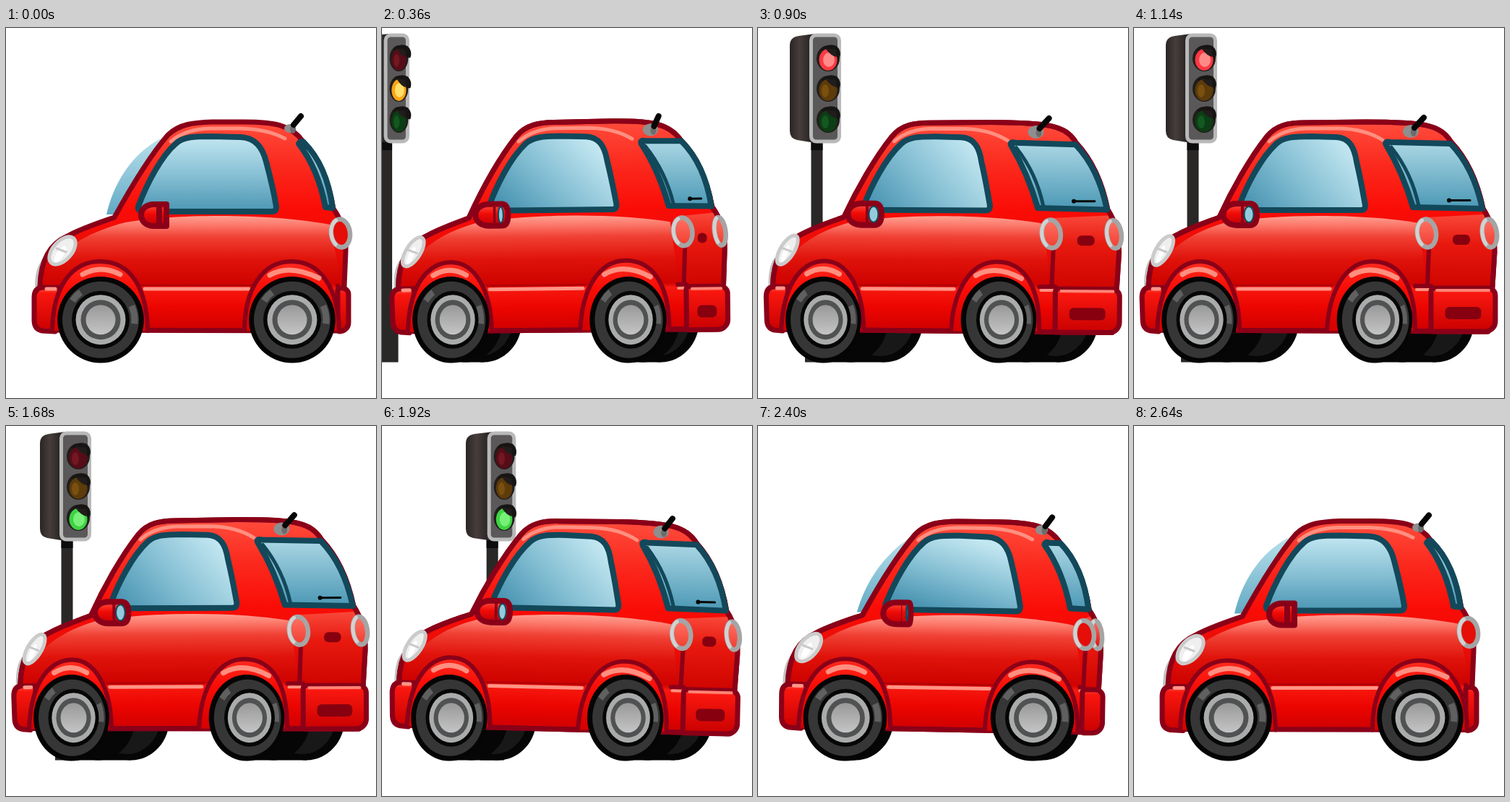
An HTML page with a canvas for the animation above (2700 ms loop, 512x512 px).

```html
<!DOCTYPE html>
<html lang="en">
<head>
<meta charset="utf-8">
<title>Car at a traffic light</title>
<style>
html, body { margin: 0; width: 100%; height: 100%; overflow: hidden; background: #fff; }
canvas { display: block; width: 512px; height: 512px; }
</style>
</head>
<body>
<canvas id="stage" width="512" height="512"></canvas>
<script>
const g = document.getElementById('stage').getContext('2d');
const LOOP = 2700, STEP = 60;
const DARK = '#8a0018', TEAL = '#12485a', SHINE = '#ff8f80';

// time, side turn, rear turn, pitch in degrees, drop
const POSES = [
  [0, 0, 0, 0, 0],
  [180, .5, .07, -.1, 0],
  [360, .88, .19, -.6, 0],
  [540, .99, .8, -2.4, 0],
  [660, 1, 1, -3.5, 0],
  [840, 1, 1, 1, 0],
  [960, 1, 1, -.4, 0],
  [1080, 1, 1, 0, 0],
  [1620, 1, 1, 0, 0],
  [1680, 1, .95, -.2, 0],
  [1920, .94, .66, 1.3, 0],
  [2160, .74, .25, 1.8, 0],
  [2460, .14, .04, .7, 1],
  [2640, 0, 0, 0, 1.5],
  [2700, 0, 0, 0, 0]
];

const lerp = (a, b, k) => a + (b - a) * k;

function poseAt(t) {
  let i = 1;
  while (POSES[i][0] < t) i++;
  const a = POSES[i - 1], b = POSES[i], k = (t - a[0]) / (b[0] - a[0]);
  return a.map((v, n) => lerp(v, b[n], k));
}

// blends the numbers of two paths of equal structure
function mix(a, b, k) {
  const to = b.match(/-?\d+/g);
  let i = 0;
  return a.replace(/-?\d+/g, v => lerp(+v, +to[i++], k).toFixed(2));
}

function ramp(x0, y0, x1, y1, ...stops) {
  const r = g.createLinearGradient(x0, y0, x1, y1);
  stops.forEach(([at, c]) => r.addColorStop(at, c));
  return r;
}

function paint(path, fill, stroke, width) {
  if (fill) { g.fillStyle = fill; g.fill(path); }
  if (stroke) { g.strokeStyle = stroke; g.lineWidth = width; g.stroke(path); }
}

const shape = (d, fill, stroke, width) => paint(new Path2D(d), fill, stroke, width);

function oval(x, y, rx, ry, fill, stroke, width, turn = 0) {
  const p = new Path2D();
  p.ellipse(x, y, Math.max(rx, .1), ry, turn, 0, 7);
  paint(p, fill, stroke, width);
}

function box(x, y, w, h, r, fill, stroke, width) {
  const p = new Path2D();
  p.roundRect(x, y, w, h, r);
  paint(p, fill, stroke, width);
}

function trafficLight(t, s) {
  let x = 79.5;
  if (t < 600) x -= .00131 * (600 - t) ** 2;
  if (t > 1618) x += .00078 * (t - 1618) ** 2;
  if (x < -60 || x > 580) return;
  const k = s ** 1.7, face = 44 * k, side = 27 + 27 * (1 - k);
  const left = x - (face + side) / 2, fx = left + side, mid = fx + face / 2;
  const on = t < 480 ? 1 : t < 1560 ? 0 : 2;

  g.fillStyle = '#2a2826';
  g.fillRect(x - 6, 155, 16, 260);
  g.fillRect(x - 14.5, 410, 33, 52.5);
  g.fillStyle = '#0c0c0c';
  g.fillRect(x - 6, 155, 16, 14);
  shape(`M${fx + 8} 8L${left + 12} 11Q${left} 13 ${left} 24V142Q${left} 153 ${left + 10} 155L${fx + 8} 159Z`,
    ramp(left, 0, fx, 0, [0, '#292524'], [.5, '#463d3b'], [1, '#2c2827']));
  box(fx + 2.5, 10, Math.max(face - 5, 1), 147, 7, '#5a5859', '#b9b9b9', 5);

  const off = ['#560d17', '#5d3b0a', '#0c3d14'];
  const lit = ['#fb3943', '#fca516', '#3ed342'];
  const glow = ['#ff8b88', '#ffe06a', '#78f078'];
  [42, 84, 127].forEach((y, i) => {
    const lx = mid + 4 * k;
    oval(lx, y, 16 * k, 18, '#211d1c');
    shape(`M${lx - 10 * k} ${y - 12}Q${lx} ${y - 22} ${lx + 12} ${y - 17}Q${lx + 19} ${y - 10} ${lx + 16} ${y - 1}Q${lx + 10} ${y + 1} ${lx + 8} ${y - 8}Z`, '#171514');
    oval(lx, y + 2, 12.5 * k, 15, i === on ? lit[i] : off[i]);
    if (i === on) oval(lx + k, y + 2, 8 * k, 10, glow[i]);
    else oval(lx - 4 * k, y + 3, 5 * k, 9, ['#741722', '#79500f', '#135820'][i]);
    shape(`M${lx - 4 * k} ${y - 14}L${lx + 11 * k} ${y - 12}L${lx + 12 * k} ${y - 2}Q${lx + 4 * k} ${y - 3} ${lx - 4 * k} ${y - 14}Z`, '#211d1c');
  });
}

function farWheel(x, w) {
  if (w < .02) return;
  const dx = 85 * w;
  g.fillStyle = '#060606';
  g.fillRect(x, 405, dx, 57.5);
  oval(x + dx, 404, 53, 58.5, '#060606');
  oval(x + dx - 6, 404, 46, 50, '#181818');
  oval(x + dx * .45, 404, 51, 58.5, '#060606');
}

function wheel(x, s, shift) {
  const y = 403.7, kx = lerp(1, .875, s), hx = x + shift * s;
  const ring = (cx, r, c) => oval(cx, y, r * kx, r, c);
  ring(x, 59.8, '#050505');
  ring(x + shift * s * .3, 53, '#363636');
  g.save();
  g.translate(x, y);
  g.scale(kx, 1);
  g.strokeStyle = '#606060';
  g.lineWidth = 9;
  [[-2.55, -2.2], [-.42, .12]].forEach(([a, b]) => {
    g.beginPath();
    g.arc(0, 0, 47, a, b);
    g.stroke();
  });
  g.restore();
  ring(hx, 40, '#060606');
  ring(hx, 34.5, '#aaabab');
  ring(hx, 27.5, '#505152');
  ring(hx, 20.5, ramp(0, y - 20, 0, y + 20, [0, '#999'], [1, '#c4c4c4']));
}

function carBody(s, q) {
  const w = (s + q) / 2, lag = s - q;
  const corner = lerp(s, q, .15);
  const side = (a, b) => mix(a, b, s), rear = (a, b) => mix(a, b, q);
  const edge = (a, b) => mix(a, b, corner);
  const x = (a, b, k = s) => lerp(a, b, k);

  // far windscreen and far headlight
  shape(side('M139 258C148 218 172 175 214 153L165 258Z', 'M120 258C132 225 160 185 190 152L150 258Z'),
    ramp(0, 155, 0, 258, [0, '#b7dfeb'], [1, '#62aac4']));
  shape(side('M40 358C40 335 46 321 58 314L60 358Z', 'M14 358C14 335 17 322 28 314L32 358Z'), '#c2c2c2');

  // shell
  const shell = side(
    'M60 418L47 357C48 320 62 298 85 288C105 277 130 269 150 262C172 222 198 178 224 148C240 133 258 131 285 130L330 130',
    'M32 418L20 357C21 322 34 298 58 287C80 275 100 269 118 262C135 225 160 180 184 150C197 134 215 131 235 131L320 130')
    + rear(
      'C370 130 395 134 411 157Q443 190 453 250C466 268 471 290 470 310L468 358L462 419Z',
      'C400 130 424 133 439 158Q471 192 483 250C495 268 499 290 499 310L496 358L490 420Z');
  shape(shell, ramp(0, 130, 0, 422, [0, '#ff4c3c'], [.2, '#fb2a1e'], [.42, '#fa0c06'], [.62, '#e80d08'],
    [.77, '#cf0300'], [.79, '#f7180f'], [.88, '#ec0500'], [1, '#cb0000']), DARK, 7);

  // shoulder light, fading down the doors
  shape(side(
    'M56 350C64 308 115 282 165 269C240 256 370 257 448 272L464 350Z',
    'M28 350C38 308 80 282 128 269C200 257 320 257 394 270L404 350Z'),
    ramp(0, 260, 0, 352, [0, '#ffa092'], [.15, '#fb7567'], [.32, '#f04034'], [.65, '#e0130b'], [1, '#cf0300']));

  // roof light
  g.lineCap = 'round';
  shape(side('M228 157Q248 140 282 139L325 139Q362 140 386 153', 'M187 157Q206 140 238 139L285 139Q320 140 344 155'), null, SHINE, 5);

  // sill crease
  shape(side('M188 356L340 356', 'M140 356L275 356'), null, '#b50008', 3);
  shape(side('M192 361L336 361', 'M144 361L271 361'), null, '#ff9486', 5);

  // side window
  shape(side(
    'M183 247C195 215 215 177 235 160C245 150 262 150 285 150L325 151C345 152 355 165 360 185C368 215 372 235 374 247Q374 254 368 254L190 254Q182 254 183 247Z',
    'M146 245C155 220 175 180 197 160C207 151 220 150 245 150L280 151C298 152 305 165 308 185C315 215 318 235 320 245Q320 252 314 252L152 252Q144 252 146 245Z'),
    ramp(x(278, 170), 254, x(278, 285), 150, [0, '#4c96b3'], [.45, '#82bdd2'], [1, '#c3e7f1']), TEAL, 8);

  // rear face
  if (w > .08) {
    const l = x(462, 406, corner), r = x(470, 498, q);
    shape(`M${l} 262L${r - 14} 258L${r} 300L${r - 2} 358L${l} 358Z`,
      ramp(0, 258, 0, 358, [0, '#f8483a'], [.4, '#e8190f'], [1, '#cf0500']));
    shape(`M${l + 2} 306L${l} 358`, null, DARK, 6);
    shape(shell, null, DARK, 7);
  }
  shape(edge('M405 160Q408 155 412 158', 'M349 162Q346 156 355 158')
    + rear('L412 158Q444 190 452 249', 'L438 160Q470 193 482 250')
    + edge('L442 248Q432 195 405 160Z', 'L386 248Q372 200 349 162Z'),
    ramp(0, 155, 0, 250, [0, '#aed9e6'], [1, '#4b98b5']), TEAL, 8);
  if (w > .2) {
    shape(edge('M405 165Q432 200 445 246', 'M356 165Q384 200 394 246'), null, TEAL, 5);
    const wx = x(452, 436) - 14 * lag;
    g.lineCap = 'round';
    shape(`M${wx} 238.5L${wx + 29 * w} 238.5`, null, '#080808', 3);
    oval(wx, 238.5, 3, 3, '#080808');
  }

  // bumpers
  const red = ramp(0, 357, 0, 422, [0, '#ff6a5b'], [.15, '#f9170f'], [1, '#c70000']);
  shape(side(
    'M68 420L50 419Q39 417 39 404L39 373Q39 360 50 359L76 359Z',
    'M34 420L23 419Q12 417 12 403L11 373Q11 360 21 359L42 359Z'), red, DARK, 7);
  shape(side('M56 361L68 361', 'M26 361L35 361'), null, '#ff9486', 5);
  const bl = x(459, 411, corner), br = x(474, 500, q);
  shape(`M${bl - 22 * w} 357L${bl} 357`, null, DARK, 6);
  shape(`M${bl - 20 * w} 362L${bl} 362`, null, SHINE, 4);
  box(bl, 360, br - bl, 60, [4, 10, 14, 3], red, DARK, 7);
  if (w > .2) {
    shape(`M${bl + 8} 363L${br - 9} 363`, null, '#ff8374', 4);
    const c = (bl + br) / 2;
    box(c - 25 * w, 386, 50 * w, 17, 6, '#87000f');
    box(x(458, 453) - 13 * lag - 12 * w, 286, 24 * w, 14, 6, '#87000f');
  }

  // arches
  const skin = ramp(0, 322, 0, 420, [0, '#ff2b1f'], [.4, '#f80c05'], [1, '#d50000']);
  shape(side(
    'M64 419C65 352 95 323 130 323C174 323 195 362 196 419',
    'M32 419C35 347 65 323 92 323C125 323 146 365 146 419'), skin, DARK, 6);
  shape(side(
    'M330 419C330 360 356 323 395 323C435 323 460 360 461 419',
    'M267 419C270 360 295 323 330 323C370 323 390 360 389 419'), skin, DARK, 6);
  g.lineCap = 'round';
  shape(side('M106 341Q131 327 158 341', 'M67 341Q89 327 112 341'), null, SHINE, 7);
  shape(side('M365 342Q392 326 433 346', 'M301 342Q328 326 364 346'), null, SHINE, 7);

  // headlight
  const hx = x(78, 40), tilt = x(-.84, -1.02);
  oval(hx, 308, 23, x(13, 9.5), '#efefef', '#cbcbcb', 5, tilt);
  oval(hx - 3, 313, 13, x(5, 3.5), '#fff', null, 0, tilt - .15);
  shape(`M${hx - 8} 305L${hx + 5} 310`, null, '#c9c9c9', 3);

  // tail lamps
  const lamp = (lx, rx, inner) => {
    oval(lx, 284, rx, 19.5, inner, '#a5a5a5', 6.5, -.13);
    g.strokeStyle = '#d2d2d2';
    g.lineWidth = 5;
    g.beginPath();
    g.ellipse(lx, 284, rx, 19.5, -.13, 2.3, 4.4);
    g.stroke();
  };
  const glass = ramp(0, 265, 0, 305, [0, '#ff7264'], [1, w > .2 ? '#f03a2c' : '#d90800']);
  if (w > .15) lamp(x(464, 492, q), x(7, 10, q), glass);
  lamp(x(463, 405, corner), 13, w > .2 ? glass : '#e50e08');

  // mirror
  shape(side(
    'M222 244L205 244C181 244 181 274 205 274L222 274Q222 274 222 259Q222 244 222 244Z',
    'M160 243L143 243C117 243 117 273 143 273L160 273Q170 273 170 258Q170 243 160 243Z'),
    ramp(0, 243, 0, 274, [0, '#ff5144'], [.45, '#f00a06'], [1, '#bd0008']), DARK, 8);
  shape(`M${x(212, 150)} 245L${x(212, 150)} 272`, null, DARK, 4 * s);
  if (w > .15) oval(x(219, 159), 258, 6.5 * w, 11, '#94cbdc', TEAL, 2);

  // antenna
  const ax = x(393, 383) - 14 * lag, ay = x(138, 142);
  oval(ax, ay + 1, x(8, 11), x(6, 9), '#8e8e8e');
  oval(ax + 4, ay + 2, 4, 6, '#6c6c6c');
  g.lineCap = 'round';
  shape(`M${ax + 5} ${ay - 4}L${ax + x(15, 18) - 9 * lag} ${ay - x(16, 18)}`, null, '#060606', 8);
}

function draw(t) {
  const [, s, q, pitch, drop] = poseAt(t);
  const w = (s + q) / 2, front = lerp(131, 90.5, s), back = lerp(396, 333, s);
  g.clearRect(0, 0, 512, 512);
  g.lineJoin = 'round';
  g.lineCap = 'butt';
  trafficLight(t, s);
  farWheel(front, w);
  farWheel(back, w);
  g.save();
  g.translate(211, 433 + drop);
  g.rotate(pitch * Math.PI / 180);
  g.translate(-211, -433);
  carBody(s, q);
  g.restore();
  g.lineCap = 'butt';
  wheel(front, s, 3);
  wheel(back, s, 4);
}

const start = performance.now();
function tick(now) {
  const t = Math.max(0, now - start) % LOOP;
  draw(Math.floor(t / STEP) * STEP);
  requestAnimationFrame(tick);
}
tick(start);
</script>
</body>
</html>
```
